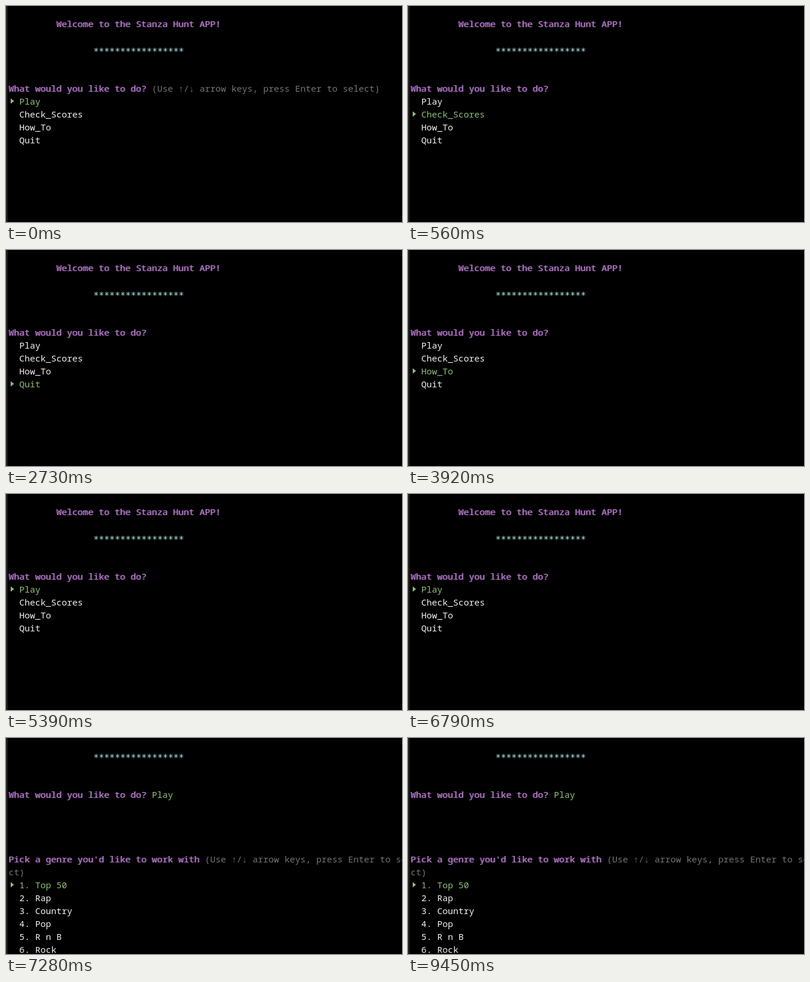
Animation of 672x368 px, one loop 9730 ms. Source, as an HTML page:

```html
<!DOCTYPE html>
<html lang="en">
<head>
<meta charset="utf-8">
<title>Terminal menu</title>
<style>
  html, body { margin: 0; width: 100%; height: 100%; overflow: hidden; background: #000; }
  #term {
    position: absolute; left: 0; top: 0; width: 672px; height: 368px; overflow: hidden;
    background: #000; color: #f2f2f2;
    font: 300 15px/22px "Noto Sans Mono", "DejaVu Sans Mono", monospace;
    font-variant-ligatures: none;
  }
  #edge { position: absolute; left: 1px; top: 0; width: 1px; height: 368px; background: #505050; }
  .row { position: absolute; left: 4.5px; height: 22px; white-space: pre; }
  .ask { color: #b67fca; text-shadow: 1px 0 #4f2c5d, -1px 0 #4f2c5d; }
  .star {
    color: #b4e6ea; position: relative; top: 3px;
    font-family: "DejaVu Sans Mono", monospace; line-height: 1;
  }
  .hint { color: #747474; }
  .pick { color: #8fc078; }
  .mark {
    position: absolute; left: 3px; top: 6px; width: 6px; height: 10px;
    background: #8fc078; clip-path: polygon(0 0, 100% 50%, 0 100%);
  }
  .cursor { position: absolute; left: .5px; top: -1px; width: 9px; height: 22px; background: #757575; }
</style>
</head>
<body>
<div id="term"><div id="edge"></div><div id="screen"></div></div>
<script>
const LOOP = 9730;
const ACTIONS = ["Play", "Check_Scores", "How_To", "Quit"];
const GENRES = ["Top 50", "Rap", "Country", "Pop", "R n B", "Rock"].map((g, i) => `${i + 1}. ${g}`);
const HINT = "(Use ↑/↓ arrow keys, press Enter to select)";

// [start ms, view, selected entry]
const STEPS = [
  [0, "hinted", 0],
  [490, "menu", 1],
  [1540, "menu", 2],
  [2450, "menu", 3],
  [3920, "menu", 2],
  [4550, "menu", 1],
  [5390, "menu", 0],
  [7140, "chosen", 0],
  [7280, "genres", 0]
];

const screen = document.getElementById("screen");
const span = (cls, text) => `<span class="${cls}">${text}</span>`;
const row = (n, html) => `<div class="row" style="top:${19 + 22 * n}px">${html}</div>`;

const list = (first, items, selected) => items.map((item, i) =>
  row(first + i, i === selected
    ? '<i class="mark"></i>  ' + span("pick", item)
    : "  " + item)).join("");

function draw(view, selected) {
  const up = view === "genres" ? 2 : 0;
  const answered = view === "chosen" || view === "genres";
  const tail = answered ? span("pick", ACTIONS[selected])
    : view === "hinted" ? span("hint", HINT) : "";

  let html = row(-up, " ".repeat(9) + span("ask", "Welcome to the Stanza Hunt APP!"))
    + row(2 - up, " ".repeat(16) + span("star", "*".repeat(17)))
    + row(5 - up, span("ask", "What would you like to do?") + " " + tail);

  if (!answered) html += list(6, ACTIONS, selected);
  if (view === "chosen") html += row(10, '<i class="cursor"></i>');
  if (view === "genres") {
    html += row(8, span("ask", "Pick a genre you'd like to work with") + " " + span("hint", HINT.slice(0, -3)))
      + row(9, span("hint", HINT.slice(-3)))
      + list(10, GENRES, 0);
  }
  screen.innerHTML = html;
}

let shown = null;
function tick() {
  const t = performance.now() % LOOP;
  const step = STEPS.findLast(s => s[0] <= t);
  if (step !== shown) {
    shown = step;
    draw(step[1], step[2]);
  }
  requestAnimationFrame(tick);
}
tick();
</script>
</body>
</html>
```
